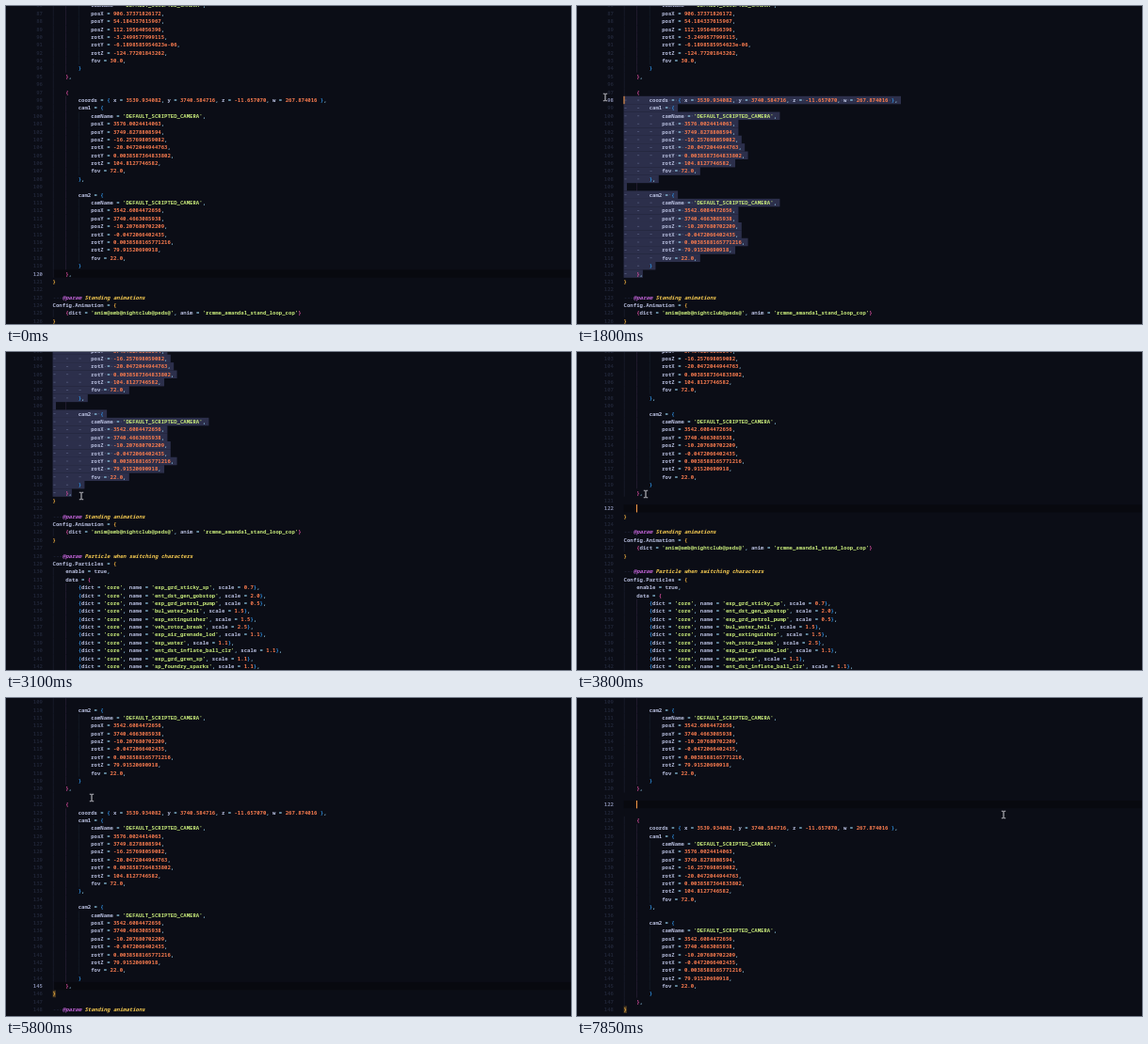
Animation, 600 px wide and 338 px high, one loop 8 s. Source, as an HTML page with a canvas:

```html
<!DOCTYPE html>
<html lang="en">
<head>
<meta charset="utf-8">
<title>Code editor</title>
<style>
html, body { margin: 0; width: 100%; height: 100%; overflow: hidden; background: #0b0d16; }
canvas { display: block; width: 600px; height: 338px; }
</style>
</head>
<body>
<canvas id="stage"></canvas>
<script>
const LOOP = 8000, TICK = 50;
const W = 600, H = 338;
const ROW = 8.386, COL = 3.384, LEFT = 49.6;
const FIRST = 86;
const ZOOM = 10; // text is laid out large and scaled down for even spacing
const FONT = `600 56.4px "Noto Sans Mono", "DejaVu Sans Mono", monospace`;

const COLORS = {
  bg: '#0b0d16', key: '#b6bddd', op: '#8fc9e6', number: '#f57a4e', string: '#c6e87a',
  tag: '#c264d8', note: '#f3c850', dim: '#20253a', gutter: '#1f2435', active: '#8087a8',
  select: '#2c2f4b', blank: '#596083', caret: '#ff9f4a'
};
const BRACES = ['#f6b340', '#d64c9c', '#2f8fe0'];
const GUIDES = ['#1d2030', '#2a2038', '#171f2d'];

// ---- text of the file ----
const pad = n => ' '.repeat(n * 4);
const camera = values => [
  pad(3) + "camName = 'DEFAULT_SCRIPTED_CAMERA',",
  ...['posX', 'posY', 'posZ', 'rotX', 'rotY', 'rotZ', 'fov']
    .map((key, i) => `${pad(3)}${key} = ${values.split(' ')[i]},`)
];
const block = [
  pad(1) + '{',
  pad(2) + 'coords = { x = 3539.934082, y = 3740.584716, z = -11.657070, w = 267.874016 },',
  pad(2) + 'cam1 = {',
  ...camera('3576.0024414063 3749.8278808594 -16.257698059082 -20.0472044944763 0.0038587364833802 104.8127746582 72.0'),
  pad(2) + '},',
  '',
  pad(2) + 'cam2 = {',
  ...camera('3542.6084472656 3740.4663085938 -10.207680702209 -0.0472066402435 0.0038588165771216 79.91520690918 22.0'),
  pad(2) + '}',
  pad(1) + '},'
];
const particles = [
  'exp_grd_sticky_sp 0.7', 'ent_dst_gen_gobstop 2.0', 'exp_grd_petrol_pump 0.5',
  'bul_water_heli 1.5', 'exp_extinguisher 1.5', 'veh_rotor_break 2.5',
  'exp_air_grenade_lod 1.1', 'exp_water 1.1', 'ent_dst_inflate_ball_clr 1.1',
  'exp_grd_gren_sp 1.1', 'sp_foundry_sparks 1.1'
].map(item => {
  const [name, scale] = item.split(' ');
  return `${pad(2)}{dict = 'core', name = '${name}', scale = ${scale}},`;
});
const head = [
  ...camera('906.37371826172 54.184337615967 112.19564056396 -3.2499577999115 -6.1898585954623e-06 -124.77201843262 30.0'),
  pad(2) + '}',
  pad(1) + '},',
  '',
  ...block
];
const tail = [
  '}',
  '',
  '---@param Standing animations',
  'Config.Animation = {',
  pad(1) + "{dict = 'anim@amb@nightclub@peds@', anim = 'rcmme_amanda1_stand_loop_cop'}",
  '}',
  '',
  '---@param Particle when switching characters',
  'Config.Particles = {',
  pad(1) + 'enable = true,',
  pad(1) + 'data = {',
  ...particles
];

// ---- timeline: every row starts with its time in ms ----
const DOCS = [
  [0, [...head, ...tail]],
  [3600, [...head, '', ...tail]],
  [3700, [...head, '', '', ...tail]],
  [3900, [...head, '', ...block, ...tail]],
  [6700, [...head, '', '', ...block, ...tail]],
  [6900, [...head, '', '', '', ...block, ...tail]]
];
// centre of row 120
const SCROLL = [
  [0, 284.5], [2350, 257.5], [2400, 230.5], [2500, 203.5],
  [2600, 176.5], [2700, 149.5], [3900, 123.4], [4700, 96.4]
];
// line, column, visible
const CARET = [
  [0, 120, 6, 0], [3600, 121, 4, 1], [3700, 122, 4, 1], [3900, 145, 6, 0],
  [6050, 121, 0, 1], [6500, 121, 0, 0], [6700, 122, 0, 1], [6900, 123, 0, 1],
  [7300, 122, 0, 1], [7750, 122, 4, 1]
];
const MOUSE = [
  [800, 110, 325], [1000, 72, 285], [1250, 44, 205], [1450, 26, 120], [1550, 30, 97],
  [1800, 30, 97], [1850, 30, 93], [1950, 180, 131], [2100, 180, 131], [2350, 83, 153],
  [2900, 83, 153], [3100, 80, 153], [3200, 73, 151], [3950, 73, 151], [4250, 198, 155],
  [4550, 198, 155], [5350, 72, 304], [5400, 72, 304], [5650, 86, 90], [5800, 91, 106],
  [6050, 91, 106], [6250, 452, 131], [7250, 452, 131], [7350, 453, 124]
];
const SELECT = { from: 1050, dragEnd: 1550, grow: 1850, caretOff: 2000, to: 3200 };

const at = (table, t) => table.findLast(row => row[0] <= t);

function mouseAt(t) {
  const i = MOUSE.findLastIndex(row => row[0] <= t);
  if (i < 0) return null;
  const [t0, x0, y0] = MOUSE[i];
  const [t1, x1, y1] = MOUSE[i + 1] || [LOOP, x0, y0];
  const p = (t - t0) / (t1 - t0);
  return [x0 + (x1 - x0) * p, y0 + (y1 - y0) * p];
}

function selectionAt(t, scroll, mouse) {
  if (t < SELECT.from || t >= SELECT.to) return null;
  if (t >= SELECT.grow) return { line: 97, col: 0 };
  if (t >= SELECT.dragEnd) return { line: 98, col: 0 };
  return {
    line: Math.min(120, Math.round(120 + (mouse[1] - scroll) / ROW)),
    col: Math.max(0, Math.round((mouse[0] - LEFT) / COL))
  };
}

// ---- drawing ----
const canvas = document.getElementById('stage');
const ctx = canvas.getContext('2d');
const ratio = Math.max(1, window.devicePixelRatio || 1);
canvas.width = W * ratio;
canvas.height = H * ratio;

const colX = col => LEFT + col * COL;
const indentOf = text => text.search(/\S/) / 4;

function rect(color, x, y, w, h) {
  ctx.fillStyle = color;
  ctx.fillRect(x, y, w, h);
}

function write(text, x, y, color, italic) {
  ctx.save();
  ctx.scale(1 / ZOOM, 1 / ZOOM);
  ctx.font = (italic ? 'italic ' : '') + FONT;
  ctx.fillStyle = color;
  ctx.fillText(text, x * ZOOM, (y + 2) * ZOOM);
  ctx.restore();
}

function colorOf(token, level) {
  if (/[{}]/.test(token)) return BRACES[level];
  if (token[0] === "'") return COLORS.string;
  if (/\d/.test(token[0]) || /^-\d/.test(token)) return COLORS.number;
  return /^\w/.test(token) ? COLORS.key : COLORS.op;
}

function drawCode(text, y) {
  if (text.startsWith('---')) {
    write('---', colX(0), y, COLORS.dim, true);
    write('@param', colX(3), y, COLORS.tag, true);
    write(text.slice(10), colX(10), y, COLORS.note, true);
    return;
  }
  const level = indentOf(text);
  for (const m of text.matchAll(/'[^']*'|-?\d+\.\d+(e-\d+)?|[A-Za-z][\w.]*|\S/g)) {
    write(m[0], colX(m.index), y, colorOf(m[0], level));
  }
}

function drawGuides(doc, i, y) {
  const depth = doc[i] ? indentOf(doc[i])
    : Math.min(indentOf(doc[i - 1] || ''), indentOf(doc[i + 1] || ''));
  for (let k = 0; k < depth; k++) {
    rect(GUIDES[k], colX(k * 4) + 0.2, y - ROW / 2, 0.7, ROW);
  }
}

function drawSelection(text, line, y, sel) {
  const start = line === sel.line ? sel.col : 0;
  const end = text.length + (line < 120 ? 1 : 0);
  if (end <= start) return;
  rect(COLORS.select, colX(start), y - ROW / 2, (end - start) * COL, ROW + 0.1);
  const indent = Math.max(0, indentOf(text)) * 4;
  for (let c = start; c < text.length; c++) {
    if (text[c] !== ' ') continue;
    if (c >= indent) rect(COLORS.blank, colX(c) + 1.2, y - 0.4, 0.9, 0.9);
    else if (c % 4 === 0) rect(COLORS.blank, colX(c) + 0.8, y - 0.3, 2.2, 0.7);
  }
}

function drawMouse([x, y]) {
  rect('#e8e8ee', x - 0.45, y - 3.8, 0.9, 7.6);
  for (const dy of [-4.2, 3.4]) {
    rect('#e8e8ee', x - 2.2, y + dy, 1.8, 0.8);
    rect('#e8e8ee', x + 0.4, y + dy, 1.8, 0.8);
  }
}

function draw(t) {
  const doc = at(DOCS, t)[1];
  const scroll = at(SCROLL, t)[1];
  const mouse = mouseAt(t);
  const sel = selectionAt(t, scroll, mouse);
  const rowY = line => scroll + (line - 120) * ROW;
  let [, line, col, on] = at(CARET, t);
  if (sel) {
    ({ line, col } = sel);
    on = t < SELECT.caretOff;
  }

  ctx.setTransform(ratio, 0, 0, ratio, 0, 0);
  rect(COLORS.bg, 0, 0, W, H);
  if (!sel) rect('rgba(0,0,0,.3)', LEFT, rowY(line) - ROW / 2, W - LEFT, ROW);

  doc.forEach((text, i) => {
    const n = FIRST + i, y = rowY(n);
    if (y < -ROW || y > H + ROW) return;
    drawGuides(doc, i, y);
    if (sel && n >= sel.line && n <= 120) drawSelection(text, n, y, sel);
    if (text === '}' && t >= 4700) rect('rgba(246,179,64,.25)', colX(0), y - 3.8, COL, 7.6);
    const label = String(n);
    write(label, 39 - label.length * COL, y, n === line ? COLORS.active : COLORS.gutter);
    drawCode(text, y);
  });

  if (on) rect(COLORS.caret, colX(col) - 0.1, rowY(line) - ROW / 2, 1, ROW);
  if (mouse) drawMouse(mouse);
}

const begin = performance.now();
function frame() {
  const t = (performance.now() - begin) % LOOP;
  draw(Math.floor(t / TICK) * TICK);
  requestAnimationFrame(frame);
}
frame();
</script>
</body>
</html>
```
